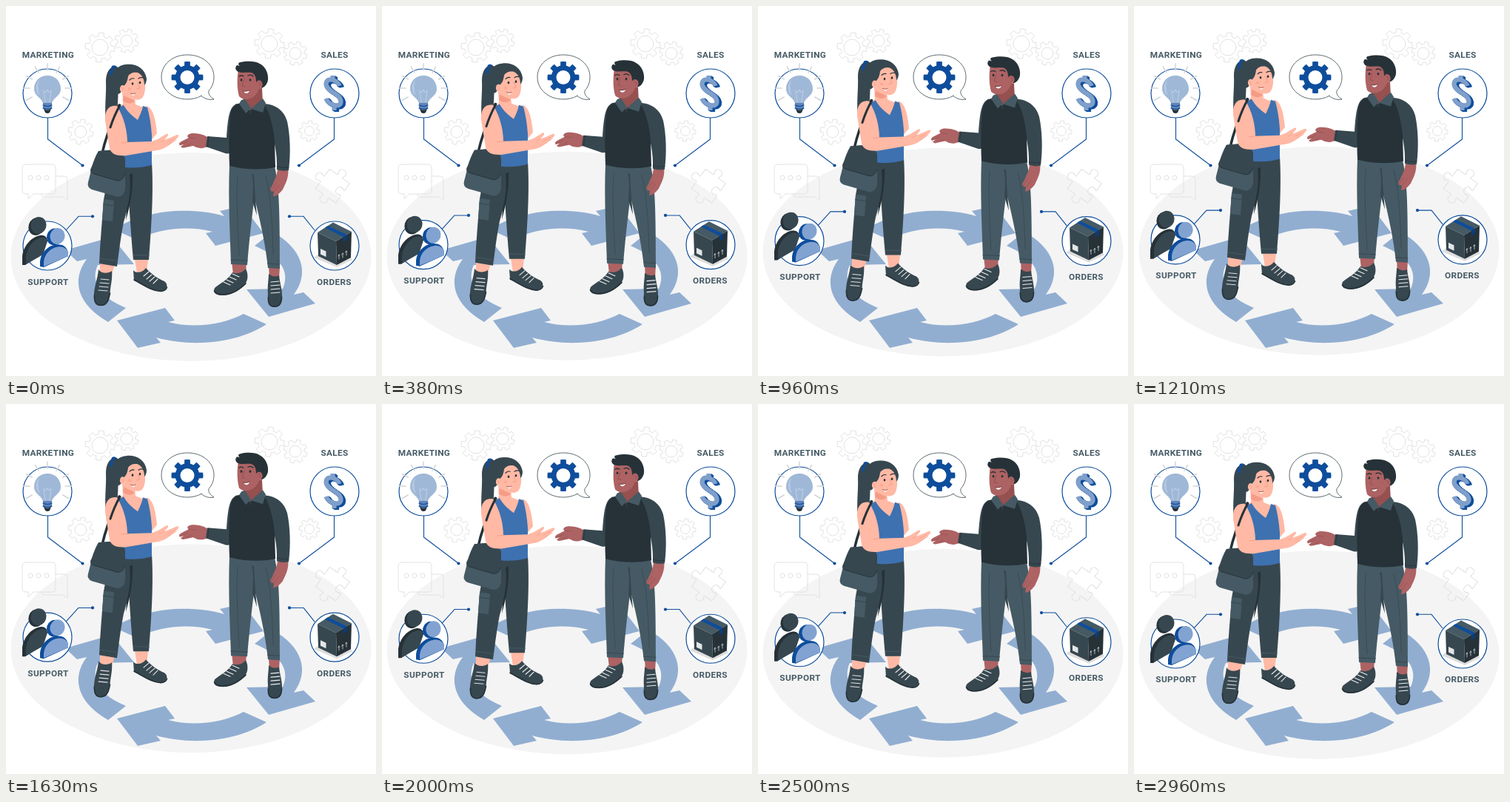
An HTML page with a canvas for the animation above (3000 ms loop, 500 by 500 pixels).

```html
<!DOCTYPE html>
<html lang="en">
<head>
<meta charset="utf-8">
<title>Business cycle</title>
<style>
html, body { margin: 0; width: 100%; height: 100%; overflow: hidden; background: #fff; }
canvas { display: block; width: 500px; height: 500px; }
</style>
</head>
<body>
<canvas id="stage"></canvas>
<script>
const LOOP = 3000, LIFT = 9;
const BLUE = '#0e4d9c', SKY = '#91aed1', TOP = '#3e71b0', INK = '#263238',
      SLATE = '#37474f', STEEL = '#455a64', PALE = '#e2e2e2',
      PEACH = '#ffb9a5', PEACH_DARK = '#f59b86', BROWN = '#ad6263', BROWN_DARK = '#95504f';

const canvas = document.getElementById('stage');
const ctx = canvas.getContext('2d');
const ratio = window.devicePixelRatio || 1;
canvas.width = canvas.height = 500 * ratio;

function fill(d, color) {
  ctx.fillStyle = color;
  ctx.fill(new Path2D(d));
}

function line(d, color, width = 1) {
  ctx.strokeStyle = color;
  ctx.lineWidth = width;
  ctx.stroke(new Path2D(d));
}

function oval(x, y, rx, ry, color, edge, width = 1, turn = 0) {
  ctx.beginPath();
  ctx.ellipse(x, y, rx, ry, turn, 0, Math.PI * 2);
  if (color) { ctx.fillStyle = color; ctx.fill(); }
  if (edge) { ctx.strokeStyle = edge; ctx.lineWidth = width; ctx.stroke(); }
}

const disc = (x, y, r, color, edge, width) => oval(x, y, r, r, color, edge, width);

function label(text, x, y) {
  ctx.font = '600 11.8px Roboto, Inter, sans-serif';
  ctx.letterSpacing = '0.35px';
  ctx.textAlign = 'center';
  ctx.fillStyle = STEEL;
  ctx.fillText(text, x, y);
}

function gear(x, y, r, hole, color, edge, turn = 0) {
  const step = Math.PI / 4, root = r * 0.76;
  ctx.beginPath();
  for (let i = 0; i < 8; i++) {
    const a = turn + i * step;
    ctx.arc(x, y, root, a - step / 2, a - 0.24);
    ctx.arc(x, y, r, a - 0.18, a + 0.18);
    ctx.arc(x, y, root, a + 0.24, a + step / 2);
  }
  ctx.closePath();
  ctx.moveTo(x + hole, y);
  ctx.arc(x, y, hole, 0, Math.PI * 2);
  if (color) { ctx.fillStyle = color; ctx.fill('evenodd'); }
  if (edge) { ctx.strokeStyle = edge; ctx.lineWidth = 1; ctx.stroke(); }
}

function badge(x, y, path, dotX, dotY) {
  line(path, BLUE, 1.1);
  disc(dotX, dotY, 2.1, BLUE);
  disc(x, y, 33, '#fff', BLUE, 1.2);
}

function cycle() {
  const half = [
    'M178 462L150 425L215 408L228 425L219 427C253 436 293 431 321 416L352 430C311 457 249 461 203 448L209 455Z',
    'M336 324L360 305C400 328 411 360 389 390L402 387L418 402L355 420L325 383L374 382C384 360 372 339 336 324Z'
  ];
  for (const turn of [0, Math.PI]) {
    ctx.save();
    ctx.translate(249, 366);
    ctx.rotate(turn);
    ctx.translate(-249, -366);
    half.forEach(d => fill(d, SKY));
    ctx.restore();
  }
}

function backdrop() {
  gear(127, 56, 20, 11, null, PALE, 0.1);
  gear(163, 47, 16, 8, null, PALE, 0.3);
  gear(356, 51, 20, 11, null, PALE, 0.1);
  gear(391, 64, 16, 8, null, PALE, 0.3);
  gear(101, 170, 17, 8, null, PALE, 0.2);
  gear(410, 169, 14, 6.5, null, PALE, 0.1);

  line('M67 230H79Q83 230 83 234V262L77 258H52Q48 258 48 254', PALE);
  line('M27 214H62Q67 214 67 219V249Q67 254 62 254H37L30 261V254H27Q22 254 22 249V219Q22 214 27 214Z', PALE);
  for (const x of [33, 44, 55]) disc(x, 232, 3, null, PALE);

  // jigsaw piece
  ctx.save();
  ctx.translate(441, 243);
  ctx.rotate(0.62);
  ctx.scale(1.08, 1.08);
  line('M-15 -15H-4C-1 -15 -4 -18 -4 -20C-4 -26 6 -26 6 -20C6 -18 3 -15 6 -15H16V-5' +
       'C16 -2 13 -5 11 -5C5 -5 5 5 11 5C13 5 16 2 16 5V15H6C3 15 6 18 6 20C6 26 -4 26 -4 20' +
       'C-4 18 -1 15 -4 15H-15V5C-15 2 -18 5 -20 5C-26 5 -26 -5 -20 -5C-18 -5 -15 -2 -15 -5Z', PALE);
  ctx.restore();
}

function speech() {
  const d = 'M264 121.5C258 124.5 252 126 245 126C225 126 210 113 210 96C210 79 225 66 245 66' +
            'C266 66 281 79 281 96C281 104 278 110 274 114.5C273 119 276 123 281 126C274 127.5 268 125 264 121.5Z';
  fill(d, '#fff');
  line(d, SLATE, 0.8);
  gear(245, 96.5, 21.5, 9.5, BLUE);
}

function marketing() {
  badge(56, 118, 'M56.5 151V180L103.5 215.5', 103.5, 215.5);
  for (let i = 0; i < 9; i++) {
    const a = Math.PI * (1 + (i - 1) / 6);
    const c = Math.cos(a), s = Math.sin(a);
    line(`M${56 + 24 * c} ${111 + 24 * s}L${56 + 33 * c} ${111 + 33 * s}`, '#d3d5d6', 1.5);
  }
  fill('M56 94C45 94 38 102 38 112C38 122 49 124 50 132H62C63 124 74 122 74 112C74 102 67 94 56 94Z', '#9fb8d7');
  fill('M46 99C39 106 39 116 46 121C43 114 42 106 46 99Z', '#b7cae1');
  line('M53 130L51 114L54 117L56 113L58 117L61 114L59 130', '#c6d5e9', 0.8);
  fill('M50 131H62V139Q56 142 50 139Z', '#5f83b8');
  line('M50 134Q56 137 62 134M50 138Q56 141 62 138', BLUE, 1.2);
  fill('M51 139Q56 142 61 139L59 144Q56 146 53 144Z', INK);
  label('MARKETING', 57, 70.3);
}

function sales() {
  badge(444, 118, 'M443.5 151V180L396 215.5', 396, 215.5);
  const s = 'M451 108C449 100 434 95 433 105C433 116 453 118 453 129C453 139 436 134 433 125M442 94V100M444 134V141';
  ctx.lineCap = 'butt';
  for (let i = 5; i >= 0; i--) {
    ctx.save();
    ctx.translate(i * 0.7 - 0.5, i * 0.4);
    line(s, i ? BLUE : '#7f9fcb', 6.2);
    ctx.restore();
  }
  ctx.lineCap = 'round';
  label('SALES', 444, 70.3);
}

function support() {
  badge(56, 324, 'M81 303L98 284.3H117', 117, 284.3);
  fill('M22 350V338C23 325 34 312 46 310C52 309 55 312 56 317L48 336L26 350Z', INK);
  fill('M27 349V339C28 327 37 315 47 313C52 312 55 314 56 318L50 336Z', SLATE);
  oval(41, 298, 10.5, 12, INK, null, 1, 0.3);
  oval(44, 296.5, 10.5, 11.5, SLATE, null, 1, 0.3);
  fill('M46 352V345C47 334 56 324 67 322.5C77 321 83 326 84 334V338L51 353Z', BLUE);
  fill('M51 352V346C52 335 60 327 70 325.5C78 324 84 329 84 335V338Z', '#82a3d1');
  oval(65.5, 312, 10.5, 11.5, BLUE, null, 1, 0.3);
  oval(69.5, 311, 10, 11, '#82a3d1', null, 1, 0.3);
  label('SUPPORT', 57, 376.5);
}

function orders() {
  badge(444, 324, 'M417 303L402 284.3H383', 383, 284.3);
  fill('M416 340L422 335L447 350L466 340L468 343L447 353Z', '#dedede');
  fill('M421 306L442 292.5L467 305L446 318Z', STEEL);
  fill('M421 306L446 318L447 350L422 338Z', SLATE);
  fill('M446 318L467 305L466 340L447 350Z', INK);
  fill('M431 299.5L435 297L460.5 309L456 312Z', BLUE);
  fill('M456 312L460.5 309V316L456 319Z', '#0a3c7d');
  fill('M425 328L432.5 331.5V339L425 335.5Z', '#e3e6e8');
  line('M450 342V336M448.8 338L450 336L451 337M455 340V334M453.8 336L455 334L456 335M460 337V331M458.8 333L460 331L461 332', '#cfd5d8', 0.8);
  label('ORDERS', 443.5, 376.5);
}

function womanLegs() {
  fill('M174 342L192 343L190 359L177 361Z', PEACH);
  fill('M127 346L147 349L143 363L127 361Z', PEACH);

  fill('M172 357C176 362 185 360 189 354C197 363 205 368 214 372C220 376 218 384 209 386C196 385 186 377 173 371Z', SLATE);
  line('M173 370C186 377 197 385 209 385.5Q216 385 217.5 380', INK, 1.6);
  line('M186 365L193 359M190 369L197 363M194 372L201 366M199 375L205 369', '#e9eced', 1.1);

  fill('M125 356C129 362 138 362 143 358C144 367 142 375 141 383C140 394 138 405 129 405C120 405 118 398 119 388C120 376 124 368 125 356Z', SLATE);
  line('M119.5 391C119 403 124 405 129 404.5C137 404 139 396 140.5 388', INK, 1.6);
  line('M128 369L139 370M127 374L139 375M126 379L138 380M125 384L137 385', '#dfe3e5', 1.1);

  fill('M160 214L197 211C199 245 198 280 193 343L172 343C170 322 168 295 166 262Z', SLATE);
  fill('M136 240L170 214C174 240 167 265 159 292C155 312 153 330 150 352L126 348C127 320 130 290 132 262Z', SLATE);
  fill('M171 226C172 248 168 268 162 290L163 276C167 260 169 246 167 228Z', INK);
  line('M172.5 336.5L193.5 337', STEEL, 1);
  line('M127 341L151 344.5', STEEL, 1);
  fill('M132 261L146 263L144 291L130 289Z', STEEL);
  line('M131.5 268L145.5 270', SLATE, 1);
}

function womanBody() {
  // ponytail
  fill('M150 82C141 80 135 89 135 102C136 120 132 142 136 162C142 163 147 158 149 146C153 130 150 110 154 95Z', SLATE);
  fill('M190 135C199 138 202 153 204 172L194 184L186 150Z', PEACH);
  fill('M157 116L174 122L175 133L188 138L181 156L150 142L158 132Z', PEACH);
  fill('M159 121L174 128C170 133 163 132 158 128Z', PEACH_DARK);
  fill('M150 138L159 134C164 143 171 149 178 154C181 148 184 141 185 135L191 137C194 148 196 160 197 174V215Q178 220 161 218C159 199 154 170 150 138Z', TOP);
}

function womanHead() {
  fill('M160 91C168 85 180 86 186 93C189 105 189 116 185 123C181 129 171 127 163 122C157 117 155 100 160 91Z', PEACH);
  fill('M146 104C141 94 148 80 162 79C175 77 188 84 190 98C190 102 189 105 187 107C187 99 184 93 178 90C172 89 167 91 165 95C164 102 162 106 159 108C158 113 156 117 152 119C147 116 146 110 146 104Z', SLATE);
  oval(157.5, 112, 3.6, 5, PEACH);
  line('M156 110Q159 111 158 114', PEACH_DARK, 0.8);
  fill('M143 81Q147 79 150 82L145 95Q141 94 140 91Z', BLUE);
  fill('M146 83Q150 81 153 84L147 100Q144 98 143 94Z', SLATE);
  line('M167 100Q170 97 173 98M179 98Q182 96 185 97', INK, 1.2);
  oval(171, 105, 1.3, 1.8, INK);
  oval(181, 103.5, 1.3, 1.8, INK);
  line('M178 104L181 111L177 112', PEACH_DARK, 1);
  fill('M169 118Q172 120 175 118Q174 121.5 171.5 121Q170 120.5 169 118Z', '#fff');
  line('M168.5 118Q172 120 175 118', '#a14e4a', 0.9);
  oval(167, 112, 2.5, 2, '#ffa995');
}

function womanArm() {
  line('M153 134C147 148 136 171 130 199', INK, 3.5);
  fill('M125 196L149 194Q160 200 161 207V247Q160 257 151 258L116 248Q109 245 111 238C115 225 116 210 125 196Z', STEEL);
  fill('M125 196L149 194Q160 200 161 207V226Q158 237 150 236L119 227Q113 224 115 219Z', SLATE);
  line('M115 220Q113 225 119 227L150 236Q158 237 161 227', INK, 0.9);
  fill('M150 135C138 133 133 143 134 155L140 192C142 201 151 203 163 202L204 195C213 194 219 189 223 186L232 178Q235 174 231 174L222 178L214 181L219 175Q220 171 215 174L205 180L197 183L164 184C164 170 160 151 150 135Z', PEACH);
  line('M164 184L156 185', PEACH_DARK, 0.9);
  line('M214 181L209 184M228 179L218 184M230 181L220 187', PEACH_DARK, 0.7);
  line('M154 134C149 143 145 151 141 164', INK, 3);
}

function manLegs() {
  fill('M305 345L325 346L324 360L307 363Z', BROWN);
  fill('M355 351L370 352L369 368L356 369Z', BROWN);

  fill('M306 360C312 363 320 360 324 355C328 363 327 372 322 377C314 385 304 391 293 391C283 391 279 387 282 381C290 374 300 370 306 360Z', SLATE);
  line('M281.5 385Q284 390 293 390C305 390 315 384 324 375', INK, 1.7);
  line('M302 366L311 370M298 370L307 374M294 373L303 377M306 362L315 366', '#eceff0', 1.1);

  fill('M355 362Q362 368 369 364C370 374 373 382 373 390C373 402 370 407 362 407C355 406 353 398 354 389C353 378 355 370 355 362Z', SLATE);
  line('M354.5 394C354 404 358 406.5 363 406C370 406 372.5 400 372.5 393', INK, 1.7);
  line('M358 373L369 372M358 378L370 377M358 383L370 382M358 388L370 387', '#eceff0', 1.1);

  fill('M330 216L363 217C369 242 370 275 370 355L354 354C351 325 345 296 335 256Z', STEEL);
  fill('M302 214L340 217C338 248 332 279 326 350L304 349C303 310 300 264 302 214Z', STEEL);
  fill('M332 227C335 240 334 250 333 264L339 283C337 262 336 246 335 228Z', SLATE);
  line('M313 229C311 256 313 300 315 337M351 230C357 253 360 289 361 335', SLATE, 0.7);
  line('M304 343L326.5 344M353.5 348L370 349', SLATE, 0.9);
}

function manBody() {
  fill('M272 177C266 173 259 172 251 172C246 173 243 176 247 178L237 183Q232 186 235 188L240 187L236 190Q238 193 243 191L253 189Q259 193 266 192L273 190Z', BROWN);
  line('M235 188L245 183M243 190L250 186M247 178L256 179', BROWN_DARK, 0.7);
  fill('M312 132C302 136 300 149 298 178L272 176L270 190L296 199Q306 202 308 190L315 145Z', SLATE);
  line('M274 177L272.5 190', INK, 0.8);

  fill('M367 218L381 219C383 232 377 241 374 248Q366 258 361 257L362 251L358 250Q356 247 360 242C362 235 367 230 367 218Z', BROWN);
  line('M362 251L369 242M358 249L365 240', BROWN_DARK, 0.7);
  fill('M346 132C365 132 376 142 380 156C384 175 385 199 382 222Q374 224 366 221C367 198 362 170 346 146Z', SLATE);
  line('M366.5 217Q374 220 382 218', INK, 0.8);

  fill('M325 112L346 111L347 132L330 143L319 131Z', BROWN_DARK);
  fill('M313 132L320 131L329 141L348 132C355 141 361 160 363 182L364 218Q334 224 302 216C301 188 301 160 304 142Q307 135 313 132Z', INK);
  fill('M318 127L323 126L331 138L324 145L315 132Z', STEEL);
  fill('M347 125L351 131L347 144L331 139Z', STEEL);
  line('M331 139L330 145', SLATE, 1);
}

function manHead() {
  fill('M314 86C323 82 338 86 343 97C344 111 341 118 334 123C328 127 319 127 315 122C312 112 312 98 314 86Z', BROWN);
  fill('M314 89C310 87 309 83 312 80L316 81C313 79 314 76 317 76C325 74 337 74 343 78C351 82 355 92 354 100C353 106 349 110 345 111L338 103C338 97 337 92 332 90C326 89 320 91 314 89Z', INK);
  oval(342, 106, 4.6, 5.7, BROWN);
  line('M341 103Q345 103 343 108', BROWN_DARK, 0.9);
  line('M315 95Q318 93 321 95M327 94Q331 92 334 95', INK, 1.3);
  oval(318, 100, 1.4, 1.8, INK);
  oval(330, 100, 1.4, 1.8, INK);
  line('M322 99L319 108L323 109', BROWN_DARK, 1);
  fill('M321 115Q325 116 329 114Q328 118 324.5 118Q322 117.5 321 115Z', '#fff');
  line('M320.5 115Q325 116 329 114', '#6d3236', 0.9);
}

function draw(now) {
  const phase = (now % LOOP) / LOOP;
  const rise = LIFT * (1 - Math.cos(phase * Math.PI * 2)) / 2;
  const lifted = (...parts) => {
    ctx.save();
    ctx.translate(0, -rise);
    parts.forEach(part => part());
    ctx.restore();
  };
  ctx.setTransform(ratio, 0, 0, ratio, 0, 0);
  ctx.fillStyle = '#fff';
  ctx.fillRect(0, 0, 500, 500);
  ctx.lineCap = ctx.lineJoin = 'round';

  lifted(() => oval(250, 339, 243.5, 141, '#f4f4f4'));
  backdrop();
  cycle();
  speech();
  marketing();
  sales();
  lifted(support, orders, womanLegs, womanBody, womanHead, womanArm,
         manLegs, manBody, manHead);
}

function tick() {
  draw(performance.now());
  requestAnimationFrame(tick);
}
tick();
</script>
</body>
</html>
```
